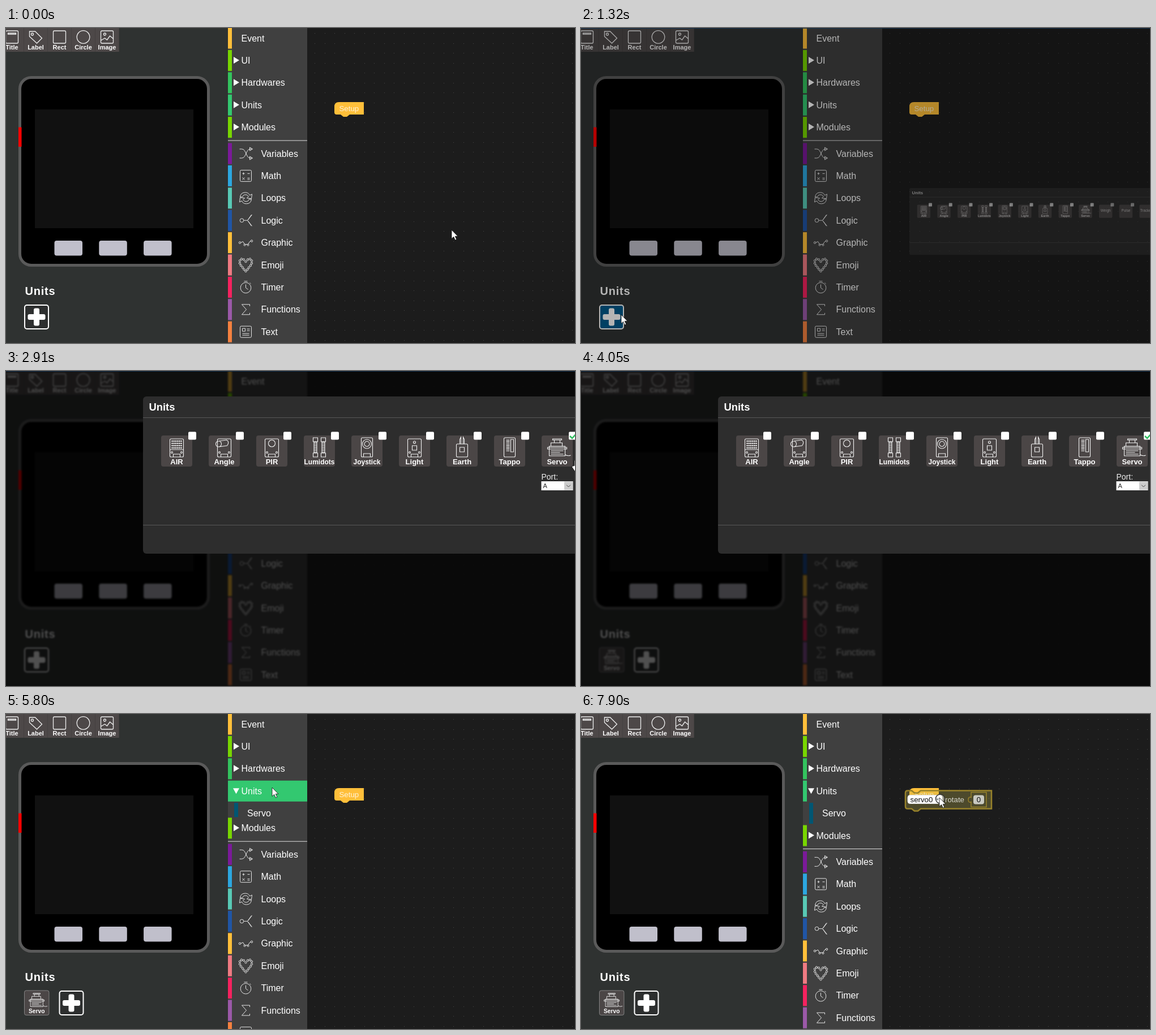
Animation of 1005x557 px, one loop 8000 ms. Source, as an HTML page with a canvas:

```html
<!DOCTYPE html>
<html lang="en">
<head>
<meta charset="utf-8">
<title>Adding a unit</title>
<style>
  html, body { margin: 0; width: 100%; height: 100%; overflow: hidden; background: #080808; }
  canvas { position: absolute; left: 0; top: 0; }
</style>
</head>
<body>
<canvas id="scene" width="1005" height="557"></canvas>
<canvas id="front" width="1005" height="557"></canvas>
<script>
const sceneEl = document.getElementById('scene');
const scene = sceneEl.getContext('2d');
const front = document.getElementById('front').getContext('2d');
let c = scene;

// ---------- timing ----------
const LOOP = 8000, STEP = 120;
const BURSTS = [[0, 2280], [2430, 3150], [4050, 4290], [4440, 4560], [4810, 5530],
  [5680, 6280], [6440, 6680], [6930, 7410], [7660, 7900]];
const clamp = v => Math.max(0, Math.min(1, v));
const ramp = (t, from, to) => clamp((t - from) / (to - from));

function snap(t) {
  const [from, to] = BURSTS.filter(b => b[0] <= t).pop();
  return Math.min(to, from + Math.floor((t - from) / STEP) * STEP);
}

const PATH = [[0, 787, 357], [240, 700, 300], [360, 560, 282], [600, 260, 380], [840, 71, 507],
  [1440, 71, 507], [1680, 544, 392], [1800, 770, 270], [1920, 953, 174], [2040, 975, 140],
  [2280, 976, 127], [2670, 980, 135], [3150, 1020, 180], [4320, 1020, 180], [4440, 685, 286],
  [4560, 680, 279], [4690, 680, 279], [5170, 470, 95], [5530, 470, 130], [5800, 470, 130],
  [6280, 502, 180], [6810, 502, 180], [7410, 607, 22], [7540, 607, 22], [7900, 633, 148]];

function pointer(t) {
  const i = PATH.findIndex(k => k[0] > t);
  if (i < 0) return PATH.at(-1).slice(1);
  const [a, b] = [PATH[i - 1], PATH[i]], p = ramp(t, a[0], b[0]);
  return [a[1] + (b[1] - a[1]) * p, a[2] + (b[2] - a[2]) * p];
}

// ---------- drawing helpers ----------
function rect(x, y, w, h, fill, r = 0, stroke, lw = 1) {
  c.beginPath();
  c.roundRect(x, y, w, h, r);
  if (fill) { c.fillStyle = fill; c.fill(); }
  if (stroke) { c.strokeStyle = stroke; c.lineWidth = lw; c.stroke(); }
}
function text(s, x, y, size, color = '#fff', weight = '', align = 'left', spacing = 0) {
  c.font = `${weight} ${size}px "Liberation Sans", Arial, sans-serif`;
  c.letterSpacing = spacing + 'px';
  c.textAlign = align;
  c.fillStyle = color;
  c.fillText(s, x, Math.round(y + size * .35));
}
function path(d, x, y, fill, stroke, lw = 1) {
  const p = new Path2D(d);
  c.save();
  c.translate(x, y);
  if (fill) { c.fillStyle = fill; c.fill(p); }
  if (stroke) { c.strokeStyle = stroke; c.lineWidth = lw; c.stroke(p); }
  c.restore();
}
const ring = (x, y, r) => `M${x - r} ${y}a${r} ${r} 0 1 0 ${2 * r} 0a${r} ${r} 0 1 0 ${-2 * r} 0`;
const frame = (x, y, w, h) => `M${x} ${y + 2}q0-2 2-2h${w - 4}q2 0 2 2v${h - 4}q0 2-2 2h${4 - w}q-2 0-2-2z`;
const many = (n, f) => Array.from({ length: n }, (_, i) => f(i)).join('');

// ---------- icons, centred on 0,0 ----------
const heart = [[0, -6], [3.5, -9.5], [7.5, -10.500], [10.5, -7.5], [10.5, -3], [8.5, 1], [5.500, 4.5], [3, 8], [0, 11]]
  .map(([x, y]) => ring(x, y, 1.7) + (x ? ring(-x, y, 1.7) : '')).join('');
const MENU = [
  ['Variables', '#7b1a99', 'M-11-8h4c8 0 7 16 15 16h3M-11 8h4c8 0 7-16 15-16h3M7-11l5 3-5 3zM7 5l5 3-5 3z'],
  ['Math', '#2ca7e0', frame(-10, -10, 20, 20) + 'M-6-4h4M-4-6v4M3-4h4M-6 3l4 4m0-4l-4 4M3 4h4m-4 2.5h4'],
  ['Loops', '#58c9b5', 'M-10-2q1-8 9-8 6 0 8 5l4-2-1 8-8-1 3-3q-3-4-7-3-3 1-4 4zM10 2q-1 8-9 8-6 0-8-5l-4 2 1-8 8 1-3 3q3 4 7 3 3-1 4-4z'],
  ['Logic', '#2055a5', ring(-7, 0, 3.3) + 'M-3.5 0H3L10-10M3 0L10 10M4-1L11-10M4 1L11 10'],
  ['Graphic', '#ffbf3a', 'M-9 0L-5-2-2 3H4L7-2 9-3' + ring(-10.5, 0, 1.7) + ring(-2, 4, 1.5) + ring(4, 4, 1.5) + ring(10.5, -3, 1.7)],
  ['Emoji', '#ef7a82', heart],
  ['Timer', '#f5225f', ring(0, 1, 9.3) + 'M0-5V1l4 3M-3-10.500h6M7-8l2 2'],
  ['Functions', '#9b59a8', 'M7-6V-9H-7L1 0-7 9H7V6'],
  ['Text', '#f5813f', frame(-10, -10, 20, 20) + 'M-6-6h5v5h-5zM2-5h5M2-2h5M-6 3H6M-6 6H6'],
];
const GROUPS = [['Event', '#ffbf3a'], ['UI', '#78d600'], ['Hardwares', '#33c35e'], ['Units', '#33c870'], ['Modules', '#78d600']];
const TOOLS = [
  ['Title', frame(-11, -11, 22, 22) + 'M-7-7H7v2H-7z'],
  ['Label', 'M-11-10l10 0L11 2 2 11-11-1z' + ring(-6, -5, 2)],
  ['Rect', frame(-11, -11, 22, 22)],
  ['Circle', ring(0, 0, 11.3)],
  ['Image', frame(-11, -11, 22, 22) + ring(-4, -5, 2) + 'M-11 6l7-4 4 3 5-7 6 5'],
];
const board = frame(-12, -15, 24, 32) + ring(-8.5, 9, 1.5) + ring(8.5, 9, 1.5) + 'M-6 17v-5h12v5';
const strip = x => `M${x - 4}-17h8v7h-8zM${x - 4} 10h8v7h-8zM${x - 2.5}-10V10M${x + 2.5}-10V10` +
  many(7, i => `M${x - 2} ${i * 3 - 9}h4`);
const UNITS = [
  ['AIR', board + many(24, i => ring(-8 + i % 6 * 3.2, -11 + (i / 6 | 0) * 4, .8)) + 'M-12 4h24'],
  ['Angle', board + ring(-10, -6, 5) + 'M-10-11L4-13q6 3 1 10L-9-1'],
  ['PIR', board + ring(0, -7, 6)],
  ['Lumidots', strip(-7) + strip(7)],
  ['Joystick', frame(-10, -17, 20, 34) + ring(0, -6, 8) + ring(0, -6, 4.5) + 'M-6 17v-6h12v6'],
  ['Light', board + ring(0, -9, 2) + 'M-4-3h8v8h-8z'],
  ['Earth', frame(-10, -6, 20, 23) + 'M-4-6v-8l2-4v12M4-6v-8l-2-4v12M-4 0h8v8h-8z'],
  ['Tappo', frame(-10, -17, 20, 34) + many(9, i => `M-6 ${i * 2.4 - 13}H0`) + 'M2-14h5V8H2z'],
  ['Servo', 'M-14-2h28v17h-28zM-17 0h34v3h-34zM-11-2v-6h20v6M-5-8v-5h10v5M-8-13H8v-2H-8zM-11 6h22M-11 9h16M-11 12h22M14 13q5 3 10 1'],
  ['Weigh'], ['Pulse'], ['Tracker'],
];

function tile(x, y, [name, icon], scale = 1) {
  c.save();
  c.translate(x, y);
  c.scale(scale, scale);
  rect(0, 0, 55, 55, '#4b4646', 4, scale < 1 && '#999');
  if (icon) {
    path(icon, 27.5, 21, null, '#f2f2f2', 1.1);
    text(name, 27.5, 46.500, name.length > 7 ? 12 : 13, '#fff', 'bold', 'center');
  } else text(name, 27.5, 25, 15, '#ddd', '', 'center');
  c.restore();
}

// ---------- blocks ----------
const blockShape = (w, h, r, dent) => `M0 ${r}Q0 0 ${r} 0${dent ? 'H11l5 4h6l5-4' : ''}` +
  `H${w}V${h}H27l-5 4h-6l-5-4H4Q0 ${h} 0 ${h - 4}z`;

function servoBlock(x, y, w, label, value, tab, valueW, unit = '', ghost = false) {
  const socket = `M5 0H${valueW + 5}V26H5V17q-5 2-5-4t5-4z`;
  path(blockShape(w, 32, 4, true), x, y, ghost ? 'rgba(190,180,80,.3)' : '#005673',
    ghost ? '#98822a' : '#0d6a87', ghost ? 2.5 : 1);
  rect(x + 4, y + 8, 61, 15, ghost ? '#fff' : '#9fbdc9', 4, ghost ? '#ddd' : '#c4d8df');
  text('servo0', x + 8.5, y + 16, 13.3, '#111');
  path('M0 0h5l-2.5 4z', x + 54, y + 14, '#234');
  text(label, x + 70, y + 16, 13.3, ghost ? '#d8d8d0' : '#fff');
  path(socket, x + tab, y + 3, ghost ? null : '#a9d6e5', ghost ? '#98822a' : null, 1.5);
  const mid = x + tab + 5 + valueW / 2;
  rect(mid - valueW / 2 + 4, y + 8, valueW - 8, 16, ghost ? '#c9c9c0' : '#e4f3f8', 4);
  text(value, mid, y + 16, 13.3, '#111', '', 'center');
  text(unit, x + 160, y + 16, 13.3);
}

// ---------- scene ----------
function plus(x, hot) {
  rect(x + 1, 490, 42, 42, hot ? '#005a8c' : '#2d2f2f', 4, '#fff', 2);
  rect(x + 6.500, 506, 31, 10, '#fff', 3);
  rect(x + 17, 495.5, 10, 31, '#fff', 3);
}

function leftPanel(t) {
  rect(0, 0, 392, 557, '#2f3231');
  rect(0, 0, 199, 42, '#4d4848');
  TOOLS.forEach(([name, icon], i) => {
    const x = 10.5 + i * 42;
    rect(x + 20.5, 0, 1, 42, '#444040');
    path(icon, x, 16, null, '#eee', 1.3);
    text(name, x, 34.5, 11, '#fff', 'bold', 'center');
  });
  rect(24.5, 87.5, 333, 332, '#000', 20, '#5a5a5a', 5);
  rect(51, 144, 280, 210, '#111');
  rect(22, 175.5, 5.500, 34.5, '#f00');
  for (let i = 0; i < 3; i++) rect(85.5 + i * 78.8, 376, 49.5, 26.5, '#c0bfcb', 4);
  text('Units', 33.5, 465, 20, '#fff', 'bold', 'left', .8);
  const added = t >= 4050;
  if (added) tile(32.5, 489, UNITS[8], .79);
  plus(added ? 93.5 : 32, t >= 960 && t < 1440);
}

function menuBar(y, color, over, x = 392) {
  rect(x, y - 18.5, over ? 532 - x : 7, 37, color);
}

function menu(t, mx, my) {
  const PITCH = 39.4, open = ramp(t, 5560, 5920), shift = open * PITCH;
  const live = t < 960 || t >= 4440;
  const over = y => live && mx > 399 && mx < 532 && Math.abs(my - y) < 18.5;
  rect(392, 0, 140, 557, '#404040');
  GROUPS.forEach(([name, color], i) => {
    const y = 18 + i * PITCH + (i > 3 ? shift : 0);
    menuBar(y, color, over(y));
    text(name, 415.5, y, 16);
    if (i === 3 && open) path('M0 0h11l-5.500 10z', 401, y - 5, '#fff');
    else if (i) path('M0 0v12l10-6z', 402, y - 6.500, '#fff');
  });
  c.save();
  c.beginPath();
  c.rect(392, 156, 140, shift);
  c.clip();
  menuBar(175.6, '#005673', over(175.6) || t >= 6440 && t < 7660, 403);
  text('Servo', 426, 175.6, 16);
  c.restore();
  rect(392, 198.5 + shift, 140, 1, '#ddd');
  MENU.forEach(([name, color, icon], i) => {
    const y = 222 + i * PITCH + shift;
    menuBar(y, color, over(y));
    path(icon, 423.5, y, null, '#e4e4e4');
    text(name, 450.500, y, 16);
  });
}

function workspace(t, mx, my) {
  rect(532, 0, 473, 557, '#1c1c1c');
  for (let x = 545; x < 1005; x += 17.5)
    for (let y = 9; y < 557; y += 17.5) rect(Math.round(x), Math.round(y), 1, 1, '#4a4a4a');
  path(blockShape(52, 22, 8, false), 580, 131, '#ffbf3a');
  text('Setup', 588.5, 142.5, 13.3, '#fff3d8');
  if (t >= 6440 && t < 7660) {
    c.globalAlpha = ramp(t, 6320, 6680);
    rect(532, 0, 215, 557, 'rgba(57,57,57,.82)', [0, 8, 8, 0]);
    servoBlock(547, 9, 151, 'rotate', '0', 111, 27);
    servoBlock(547, 66, 183, 'wirte', '600', 106, 40, 'µs');
    c.globalAlpha = 1;
  }
  if (t >= 7660)
    servoBlock(mx - 60, my - 12.5, 152, 'rotate', '0', 111, 27, '', t >= 7900);
}

function dialog(t, p) {
  c.save();
  c.globalAlpha = p;
  c.translate(830, 459);
  c.scale(p, p);
  c.translate(-830, -459);
  rect(242, 45, 1176, 278, '#2d2d2d', 6);
  rect(242, 82, 1176, 1, '#585858');
  rect(242, 272, 1176, 1, '#585858');
  text('Units', 252.5, 64, 18.4, '#fff', 'bold');
  UNITS.forEach((unit, i) => {
    tile(274 + i * 84, 114, unit);
    rect(322 + i * 84, 107.5, 14, 14, unit[1] ? '#fff' : '#ccc', 2);
  });
  if (t >= 2430) {
    path('M0 0l4 4 8-9', 996, 115, null, '#2fbf5f', 2.5);
    text('Port:', 945.5, 187, 14, '#eee');
    rect(945.5, 195, 56, 16, '#fff');
    rect(986, 195.5, 15, 15, '#ccc');
    path('M0 0l3.500 3.500L7 0', 990, 201.5, null, '#444');
    text('A', 948.5, 203.5, 11, '#222');
  }
  c.restore();
}

const ARROW = 'M0 0V15.500L3.700 12.200 6.300 18 8.800 17 6.300 11.300H11z';
const HAND = 'M4 10V1.500q0-1.500 1.500-1.500T7 1.500V7l6 1.500q2 .5 2 2.500l-1 6-1.500 4h-7L0 13q-1-2 1-2.500z';

function draw(now) {
  const t = snap(now % LOOP), [mx, my] = pointer(t);
  const shown = t < 4050 ? ramp(t, 1065, 1665) : 1 - ramp(t, 4050, 4290);

  c = scene;
  workspace(t, mx, my);
  leftPanel(t);
  menu(t, mx, my);
  sceneEl.style.filter = shown ? `blur(${shown === 1 ? 1.5 : 0}px) brightness(${1 - .69 * shown})` : 'none';

  c = front;
  c.clearRect(0, 0, 1005, 557);
  if (shown) {
    rect(0, 0, 1005, 1, '#12304d');
    dialog(t, shown);
  }
  if (t >= 7900) rect(626.5, 142, 16, 16, 'rgba(255,255,255,.45)', 8, '#333', 1.5);
  const hand = shown === 1 && mx > 940 && my < 190;
  path(hand ? HAND : ARROW, mx, my, '#fff', '#111', .8);
}

const start = performance.now();
(function loop() {
  draw(performance.now() - start);
  requestAnimationFrame(loop);
})();
</script>
</body>
</html>
```
